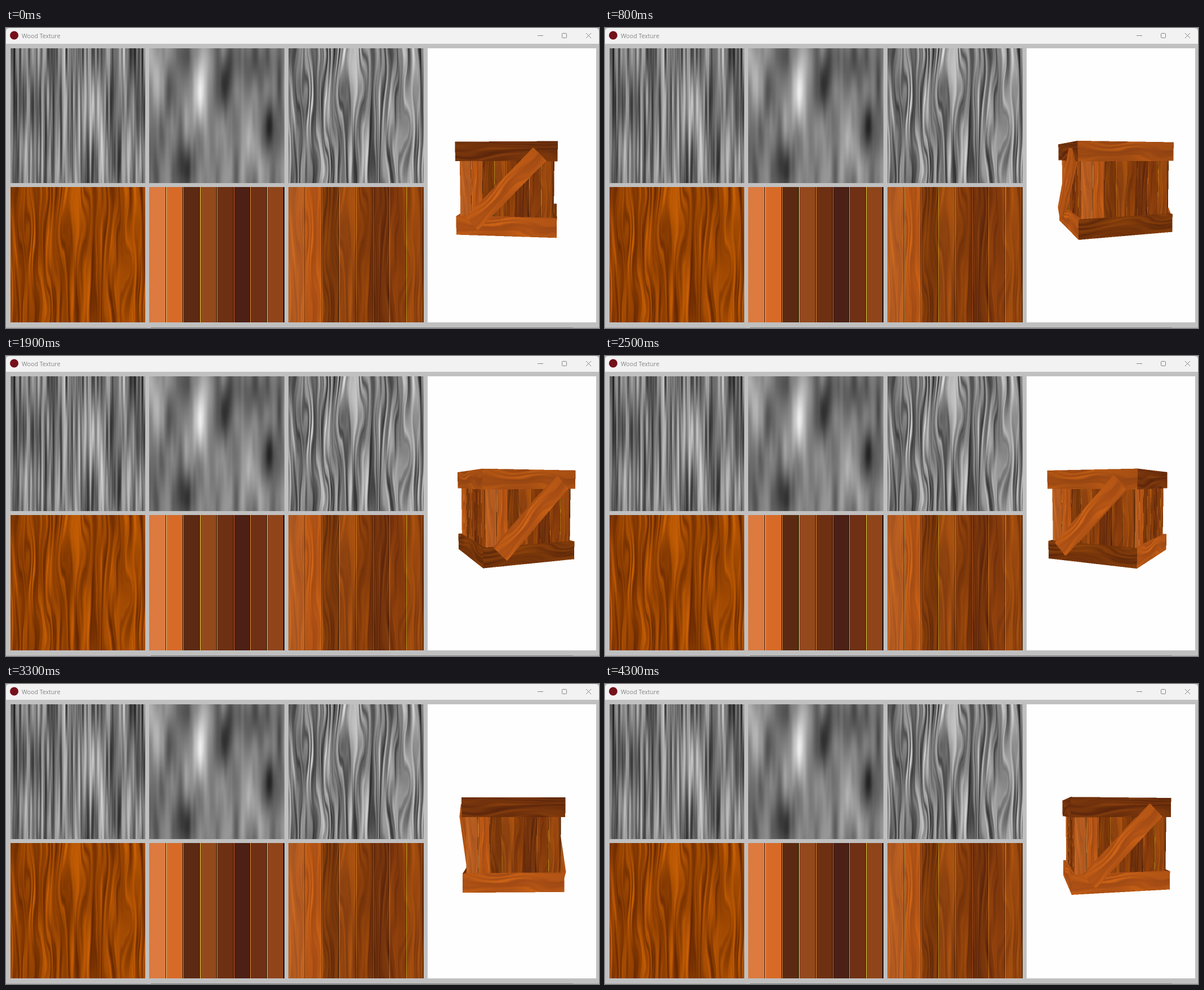
Recreate the animation shown at these times as an HTML page with a canvas. Size 1052x532 px, loop 4400 ms.

```html
<!DOCTYPE html>
<html lang="en">
<head>
<meta charset="utf-8">
<title>Wood Texture</title>
<style>
  html, body { margin: 0; width: 100%; height: 100%; overflow: hidden; background: #c0c0c0; }
  svg, canvas { position: absolute; left: 0; top: 0; display: block; }
</style>
</head>
<body>
<svg width="1052" height="532" viewBox="0 0 1052 532">
  <rect width="1052" height="532" fill="#c0c0c0"/>
  <rect width="1052" height="20" fill="#b4bcc0"/>
  <path d="M0 28V7Q0 0 7 0H1045Q1052 0 1052 7V28Z" fill="#f2f2f2"/>
  <circle cx="14.5" cy="13" r="7.5" fill="#74101a"/>
  <text x="28" y="17.5" font-family="'Open Sans', 'Noto Sans', sans-serif" font-size="10.6" fill="#858585">Wood Texture</text>
  <g fill="none" stroke="#858585">
    <path d="M943 13.5H953"/>
    <rect x="986.5" y="9.5" width="8" height="8" rx="1"/>
    <path d="M1029 9L1038 18M1038 9L1029 18"/>
  </g>
  <rect x="748" y="36" width="299" height="486" fill="#fefefe"/>
  <path d="M0 531.5H250M1006 531.5H1052" stroke="#acacac"/>
  <path d="M257 531.5H1006" stroke="#858585"/>
</svg>
<canvas id="view" width="1052" height="532"></canvas>
<script>
const SIZE = 240;
const view = document.getElementById('view').getContext('2d');

/* ---------- noise ---------- */
const mix = (a, b, t) => a + (b - a) * t;
const clamp = v => Math.max(0, Math.min(1, v));
const fade = t => t * t * (3 - 2 * t);

function hash(i, j, seed) {
  const s = Math.sin(i * 127.1 + j * 311.7 + seed * 74.7) * 43758.5453;
  return s - Math.floor(s);
}

function noise(x, y, seed) {
  const i = Math.floor(x), j = Math.floor(y);
  const fx = fade(x - i), fy = fade(y - j);
  return mix(
    mix(hash(i, j, seed), hash(i + 1, j, seed), fx),
    mix(hash(i, j + 1, seed), hash(i + 1, j + 1, seed), fx), fy);
}

function streaks(x, y) {
  const n = 0.56 * noise(x / 3.3, y / 100, 1)
    + 0.26 * noise(x / 1.8, y / 80, 2)
    + 0.18 * noise(x / 9, y / 120, 3);
  return clamp(0.48 + (n - 0.5) * 0.95);
}

// x, y, width, height, strength
const blobs = [
  [8, 30, 10, 50, 0.22], [91, 82, 9, 40, 0.36], [64, 95, 9, 35, 0.1],
  [66, 10, 13, 25, -0.18], [137, 62, 11, 38, -0.24], [213, 142, 8, 32, -0.36],
  [68, 210, 14, 32, -0.25], [181, 165, 10, 40, 0.24], [210, 215, 20, 30, 0.08],
  [190, 25, 35, 30, -0.14], [105, 25, 12, 30, 0.1], [20, 225, 14, 30, -0.06]
];

function clouds(x, y) {
  let v = 0.47 + 0.28 * (noise(x / 11, y / 75, 4) - 0.5) + 0.08 * (noise(x / 5, y / 60, 5) - 0.5);
  for (const [bx, by, w, h, k] of blobs) {
    v += k * Math.exp(-(((x - bx) / w) ** 2 + ((y - by) / h) ** 2) / 2);
  }
  return clamp(v);
}

const grain = (x, y) => streaks(x + 38 * (clouds(x, y) - 0.47) + 300, y);

/* ---------- textures ---------- */
const planks = [
  [220, 122, 63], [216, 106, 40], [92, 42, 18], [147, 73, 28],
  [110, 48, 18], [76, 32, 21], [112, 48, 21], [143, 69, 25]
];
const gaps = ['#ffd890', '#f08a38', '#e6e23c', '#f09432', '#ec6428', '#f09432', '#e0e43c', '#141008']
  .map(c => [1, 3, 5].map(i => parseInt(c.slice(i, i + 2), 16)));

function wood(x, y) {
  const v = clamp(0.48 + (grain(x, y) - 0.48) * 1.5);
  return [mix(96, 204, v), mix(36, 98, v), mix(0, 4, v)];
}

// a dark and a bright column part neighbouring planks
const seam = n => Math.round(29.88 * n + 0.2);

function plank(x) {
  let i = 0;
  while (x >= seam(i + 1)) i++;
  if (x === seam(i + 1) - 1) return [18, 10, 6];
  return i && x === seam(i) ? gaps[i - 1] : planks[i];
}

function boards(x, y) {
  const a = wood(x, y), b = plank(x);
  return a.map((c, i) => (c + b[i]) / 2);
}

const grey = f => (x, y) => Array(3).fill(f(x, y) * 255);

function texture(f) {
  const canvas = document.createElement('canvas');
  canvas.width = canvas.height = SIZE;
  const c = canvas.getContext('2d');
  const img = c.createImageData(SIZE, SIZE);
  for (let y = 0, p = 0; y < SIZE; y++) {
    for (let x = 0; x < SIZE; x++, p += 4) {
      img.data.set([...f(x, y), 255], p);
    }
  }
  c.putImageData(img, 0, 0);
  return { canvas, data: img.data };
}

planks.push([20, 16, 8]);
const textures = [grey(streaks), grey(clouds), grey(grain), wood, plank, boards].map(texture);
const skin = textures[5].data;

textures.forEach((t, i) => {
  const x = [8, 254, 501][i % 3], low = i > 2;
  view.drawImage(t.canvas, x, low ? 282 : 36, x === 8 ? 239 : 240, low ? 240 : 239);
});

/* ---------- crate ---------- */
const LEFT = 780, TOP = 194, W = 236, H = 190, SS = 2;
const CX = 898, CY = 278.4;
const FOCAL = 586, DIST = 7.42, PITCH = 5 * Math.PI / 180;
const sp = Math.sin(PITCH), cp = Math.cos(PITCH);

const buffer = document.createElement('canvas');
buffer.width = W * SS;
buffer.height = H * SS;
const bufCtx = buffer.getContext('2d');
const image = bufCtx.createImageData(W * SS, H * SS);
const depth = new Float32Array(W * H * SS * SS);

// u: along the side, y: up, w: outwards
function project([u, y, w], a) {
  const x = u * Math.cos(a) + w * Math.sin(a);
  const z = w * Math.cos(a) - u * Math.sin(a);
  const q = 1 / (DIST - z * cp - y * sp);
  return {
    x: (CX + FOCAL * x * q - LEFT) * SS,
    y: (CY - FOCAL * (y * cp - z * sp) * q - TOP) * SS,
    q
  };
}

function triangle(A, B, C, shade) {
  const area = (B.x - A.x) * (C.y - A.y) - (B.y - A.y) * (C.x - A.x);
  if (Math.abs(area) < 1e-6) return;
  const w = W * SS, h = H * SS;
  const x0 = Math.max(0, Math.floor(Math.min(A.x, B.x, C.x)));
  const x1 = Math.min(w - 1, Math.ceil(Math.max(A.x, B.x, C.x)));
  const y0 = Math.max(0, Math.floor(Math.min(A.y, B.y, C.y)));
  const y1 = Math.min(h - 1, Math.ceil(Math.max(A.y, B.y, C.y)));
  const edge = (P, Q, x, y) => ((Q.x - P.x) * (y - P.y) - (Q.y - P.y) * (x - P.x)) / area;
  const texel = v => Math.max(0, Math.min(SIZE - 1, Math.floor(v * SIZE)));
  for (let y = y0; y <= y1; y++) {
    for (let x = x0; x <= x1; x++) {
      const a = edge(B, C, x + 0.5, y + 0.5), b = edge(C, A, x + 0.5, y + 0.5), c = 1 - a - b;
      if (a < 0 || b < 0 || c < 0) continue;
      const aq = a * A.q, bq = b * B.q, cq = c * C.q, q = aq + bq + cq;
      const p = y * w + x;
      if (q <= depth[p]) continue;
      depth[p] = q;
      const s = texel((aq * A.s + bq * B.s + cq * C.s) / q);
      const t = texel((aq * A.t + bq * B.t + cq * C.t) / q);
      const from = (t * SIZE + s) * 4, to = p * 4;
      for (let i = 0; i < 3; i++) image.data[to + i] = skin[from + i] * shade;
      image.data[to + 3] = 255;
    }
  }
}

function quad(points, uv, a, shade = 1) {
  const v = points.map((p, i) => ({ ...project(p, a), s: uv[i][0], t: uv[i][1] }));
  triangle(v[0], v[1], v[2], shade);
  triangle(v[0], v[2], v[3], shade);
}

const rect = (u, y0, y1, w) => [[-u, y1, w], [u, y1, w], [u, y0, w], [-u, y0, w]];
const whole = [[0, 0], [1, 0], [1, 1], [0, 1]];

// one plank of the texture, turned to lie along the board
function strip(i) {
  const a = (i + 0.1) / 8, b = (i + 0.88) / 8;
  return [[a, 0], [a, 1], [b, 1], [b, 0]];
}

function brace(a) {
  const ends = [[-0.79, -0.56], [0.54, 0.81], [0.79, 0.56], [-0.54, -0.81]];
  const front = ends.map(([u, y]) => [u, y, 1.07]);
  const back = ends.map(([u, y]) => [u, y, 0.95]);
  quad(front, strip(1), a);
  for (let i = 0; i < 4; i++) {
    const j = (i + 1) % 4;
    quad([front[i], front[j], back[j], back[i]], strip(1), a, 0.94);
  }
}

const TALL = 0.928, INSET = 0.93, LEDGE = -0.55;
const dark = [5, 1], bright = [1, 0.98];
const sides = [
  { top: dark, base: bright, brace: true },
  { top: [1, 0.89], base: [2, 0.97] },
  { top: [1, 0.92], base: [2, 0.97], brace: true },
  { top: dark, base: bright }
];

function drawCrate(step) {
  image.data.fill(0);
  depth.fill(0);
  sides.forEach((side, i) => {
    const a = (i * 90 - 7.6 - 7.9 * step) * Math.PI / 180;
    const [top, topShade] = side.top, [base, baseShade] = side.base;
    quad(rect(INSET, -TALL, TALL, INSET), whole, a);
    quad(rect(1, 0.549, TALL, 1), strip(top), a, topShade);
    quad(rect(1, -TALL, LEDGE, 1), strip(base), a, baseShade);
    quad([[-INSET, LEDGE, INSET], [INSET, LEDGE, INSET], [1, LEDGE, 1], [-1, LEDGE, 1]],
      strip(base), a, baseShade);
    if (side.brace) brace(a);
  });
  bufCtx.putImageData(image, 0, 0);
  view.clearRect(LEFT, TOP, W, H);
  view.drawImage(buffer, LEFT, TOP, W, H);
}

/* ---------- clock ---------- */
const LOOP = 4400, TICK = 100;
const start = performance.now();
let shown = -1;

function frame() {
  const step = Math.floor(((performance.now() - start) % LOOP) / TICK);
  if (step !== shown) drawCrate(shown = step);
  requestAnimationFrame(frame);
}
frame();
</script>
</body>
</html>
```
